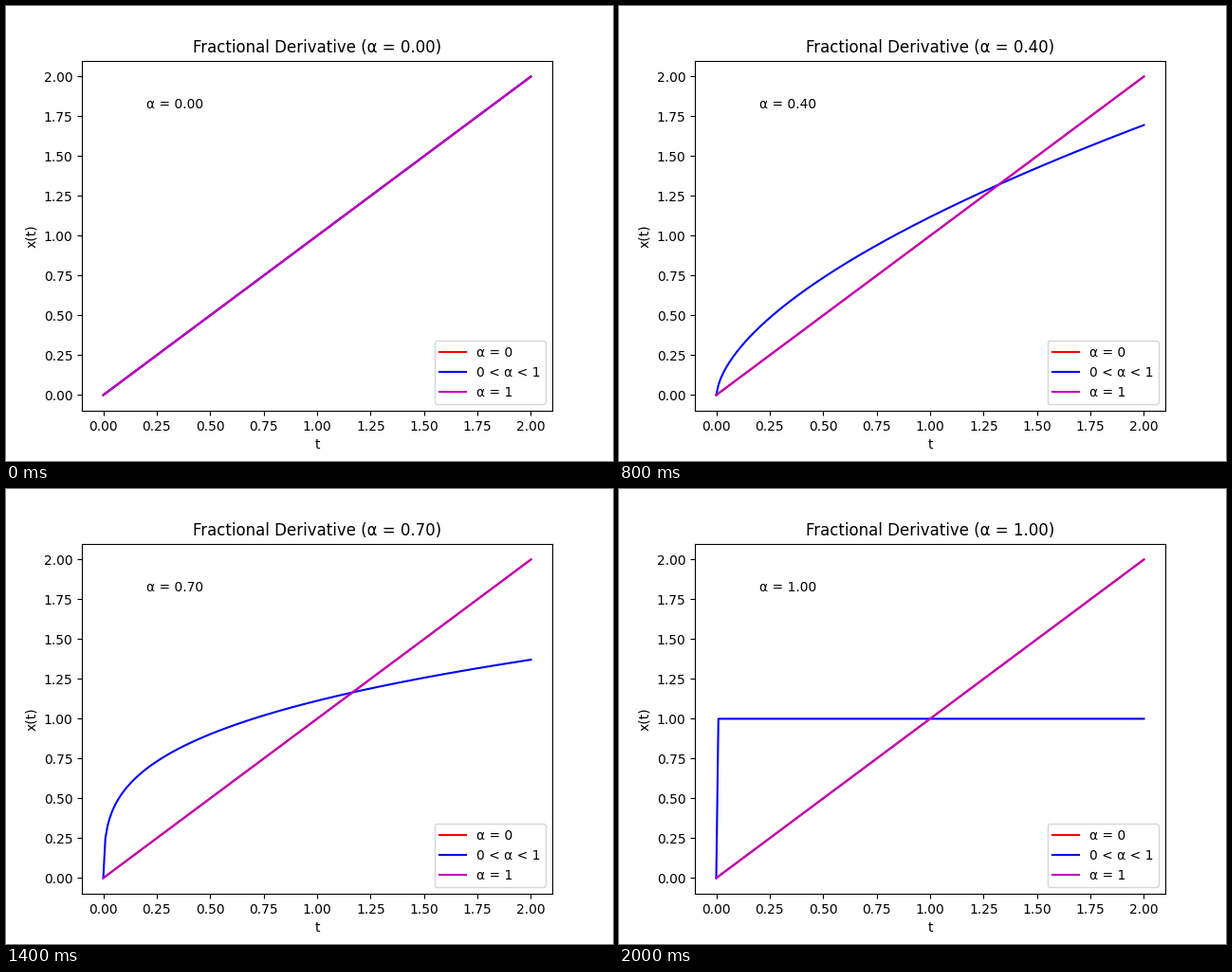
These frames come from a looping animation (640 px wide and 480 px high, 2.1 s). A matplotlib script:

```python
import numpy as np
import matplotlib.pyplot as plt
from matplotlib.animation import FuncAnimation

plt.rcParams["font.family"] = "DejaVu Sans"

FRAMES = 21
STEP = 0.01
t = np.arange(201) * STEP


def fractional_derivative(x, alpha):
    """Grünwald–Letnikov derivative of order alpha."""
    k = np.arange(1, len(x))
    weights = np.concatenate(([1.0], np.cumprod(1 - (alpha + 1) / k)))
    return np.convolve(weights, x)[:len(x)] / STEP**alpha


fig, ax = plt.subplots(figsize=(6.4, 4.8), dpi=100)
ax.plot(t, t, "r", label="α = 0")
curve, = ax.plot(t, t, "b", label="0 < α < 1")
ax.plot(t, t, "m", label="α = 1")
ax.set_xlabel("t")
ax.set_ylabel("x(t)")
ax.legend(loc="lower right")
title = ax.set_title("")
note = ax.text(0.2, 1.8, "")


def update(i):
    alpha = i / (FRAMES - 1)
    curve.set_ydata(fractional_derivative(t, alpha))
    title.set_text(f"Fractional Derivative (α = {alpha:.2f})")
    note.set_text(f"α = {alpha:.2f}")
    return curve, title, note


anim = FuncAnimation(fig, update, frames=FRAMES, interval=100,
                     repeat=True, repeat_delay=0, blit=False)
plt.show()
```
